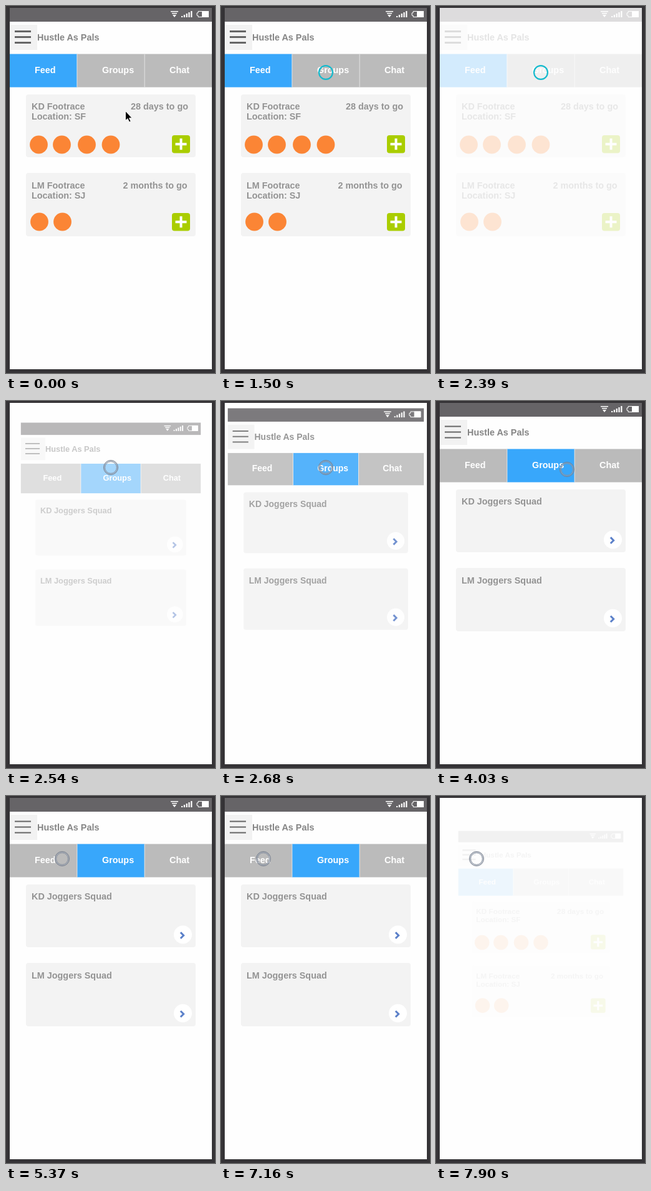
An HTML page that plays this animation: 335 by 585 pixels, repeating every 8 s.

```html
<!DOCTYPE html>
<html lang="en">
<head>
<meta charset="utf-8">
<title>App prototype</title>
<style>
  html, body { margin: 0; width: 100%; height: 100%; overflow: hidden; background: #353336; }
  svg { display: block; }
  text { font: bold 14.4px "Liberation Sans", Arial, sans-serif; fill: #939393; }
  .title { fill: #858585; }
  .tab { fill: #fff; }
</style>
</head>
<body>
<svg id="stage" width="335" height="585" viewBox="0 0 335 585"></svg>
<script>
const LOOP = 8000;
const CENTER = { x: 168, y: 289.5 };

const rect = (x, y, w, h, fill, r = 0) =>
  `<rect x="${x}" y="${y}" width="${w}" height="${h}" rx="${r}" fill="${fill}"/>`;
const text = (x, y, str, cls = '') => `<text x="${x}" y="${y}" class="${cls}">${str}</text>`;
const circle = (x, y, r, fill) => `<circle cx="${x}" cy="${y}" r="${r}" fill="${fill}"/>`;

function statusBar() {
  const bars = [0, 1, 2, 3, 4].map(i =>
    rect(281 + i * 3.8, 16 - i * 2, 2.2, 2 + i * 2, '#fff')).join('');
  return rect(6, 3, 324, 22, '#666467')
    + rect(264, 8, 12, 1.5, '#fff') + rect(266, 11, 8, 1.5, '#fff')
    + '<path d="M267 14h6l-3 4z" fill="#fff"/>' + bars
    + '<path d="M308 8.5h16.5v9H308v-2.5h-2v-4h2z" fill="none" stroke="#fff"/>'
    + rect(314, 8, 11, 10, '#fff');
}

function header(active, lineTop, lineHeight) {
  const lines = [0, 9, 18].map(d => rect(14, lineTop + d, 26, lineHeight, '#666')).join('');
  const tabs = [['Feed', 6, 46], ['Groups', 114, 154], ['Chat', 222, 262]].map(([name, x, tx]) =>
    rect(x, 76.5, 108, 53, name === active ? '#38a7fb' : '#bbb') + text(tx, 107, name, 'tab')).join('');
  return statusBar() + rect(6, 30, 44, 40, '#f2f2f2') + lines
    + text(50, 55, 'Hustle As Pals', 'title') + tabs
    + rect(113.4, 76.5, 1, 53, '#e4e4e4') + rect(221.6, 76.5, 1, 53, '#e4e4e4');
}

const card = (y, h) => rect(32, y, 272, h, '#f3f3f3', 4);

const plus = y => rect(266, y, 29, 28.5, '#aacd00', 4)
  + rect(271.5, y + 12.2, 18, 4, '#fff') + rect(278.5, y + 5.2, 4, 18, '#fff');

const chevron = y => circle(283.5, y, 14.5, '#fff')
  + `<path d="M279.8 ${y - 3.6}l4.8 4.8-4.8 4.8" fill="none" stroke="#5b80c9" stroke-width="3"/>`;

const dots = (xs, y) => xs.map(x => circle(x, y, 14.4, '#fb8535')).join('');

const feed = header('Feed', 39, 3)
  + card(141, 100) + text(41, 165, 'KD Footrace') + text(41, 181, 'Location: SF')
  + text(200, 165, '28 days to go') + dots([52.5, 89.5, 129.5, 168], 221) + plus(206)
  + card(266, 101) + text(41, 291, 'LM Footrace') + text(41, 307, 'Location: SJ')
  + text(187.5, 291, '2 months to go') + dots([53.5, 90.5], 344) + plus(330);

const groups = header('Groups', 39.5, 2)
  + card(141, 100) + text(41, 165, 'KD Joggers Squad') + chevron(221)
  + card(266, 101) + text(41, 291, 'LM Joggers Squad') + chevron(346.3);

const ring = (r, color, w) =>
  `<circle r="${r}" fill="none" stroke="${color}" stroke-width="${w}"/>`;

const stage = document.getElementById('stage');
stage.innerHTML = rect(6, 3, 324, 576, '#fefefe')
  + `<g id="feed">${feed}</g><g id="groups">${groups}</g>`
  + '<path id="arrow" d="M191.5 167.5v15l3.5-3 2.6 5.5 2.4-1.1-2.5-5.2h4.6z" fill="#000" stroke="#fff" stroke-width=".9"/>'
  + `<g id="idle">${ring(10.4, 'rgba(150,162,180,.5)', 2.6)}${ring(11.5, '#747b88', .9)}${ring(9.4, '#868d9a', .8)}</g>`
  + `<g id="press">${ring(10.9, '#14bacd', 2.2)}</g>`;
const el = id => document.getElementById(id);

// Pointer stops: time, x, y
const stops = [
  [900, 199, 174], [1050, 195, 169], [1200, 168, 109], [1350, 168, 107], [1500, 168, 106],
  [4030, 210, 109], [4170, 231, 110], [4320, 252, 110], [4470, 257, 110], [4920, 204, 105],
  [5070, 135, 102], [5220, 91, 101], [5370, 90, 100], [7160, 68, 100], [7310, 65, 100]
];

// Screen states: time, screen, opacity, zoom progress
const views = [
  [0, 'feed', 1, 1], [2390, 'feed', .21, 1], [2540, 'groups', .45, .45],
  [2680, 'groups', .85, .85], [2830, 'groups', 1, 1], [7900, 'feed', .08, .08]
];

const at = (list, t) => list.filter(s => s[0] <= t).pop();
const show = (id, on) => el(id).setAttribute('visibility', on ? 'visible' : 'hidden');

function draw(now) {
  const t = now % LOOP;
  const [, name, opacity, zoom] = at(views, t);
  const scale = .8 + .2 * zoom;
  for (const id of ['feed', 'groups']) show(id, id === name);
  el(name).setAttribute('opacity', opacity);
  el(name).setAttribute('transform',
    `translate(${CENTER.x * (1 - scale)} ${CENTER.y * (1 - scale)}) scale(${scale})`);

  const stop = at(stops, t);
  const pressed = t >= 1500 && t < 2540;
  show('arrow', !stop);
  show('idle', stop && !pressed);
  show('press', pressed);
  if (stop) {
    for (const id of ['idle', 'press']) el(id).setAttribute('transform', `translate(${stop[1]} ${stop[2]})`);
  }
}

function tick() {
  draw(performance.now());
  requestAnimationFrame(tick);
}
tick();
</script>
</body>
</html>
```
